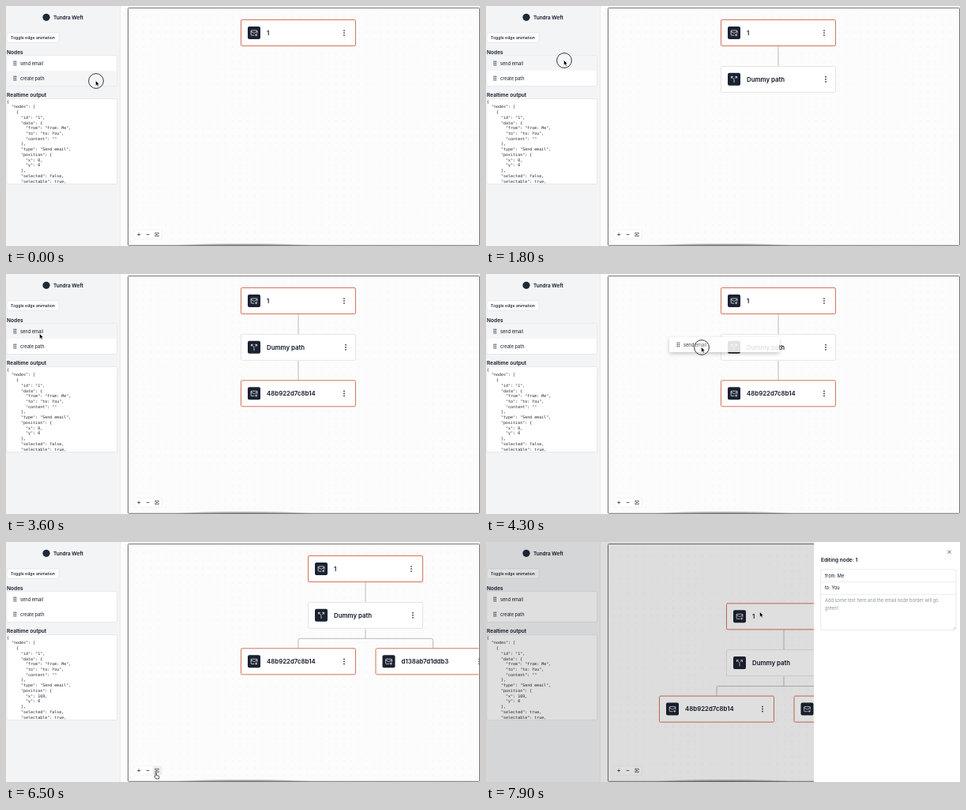
An HTML page for the animation above (8 s loop, 600 by 304 pixels).

```html
<!DOCTYPE html>
<html lang="en">
<head>
<meta charset="utf-8">
<title>Flow editor</title>
<style>
  html, body { margin: 0; width: 100%; height: 100%; overflow: hidden; background: #fcfcfc; }
  svg { display: block; width: 600px; height: 304px; font-family: Inter, "Liberation Sans", sans-serif; font-size: 5.7px; fill: #111827; }
  .bold { font-weight: 600; font-size: 6.6px; }
  .title { font-weight: 600; font-size: 7.85px; }
  .code { font: 5px "DejaVu Sans Mono", monospace; white-space: pre; fill: #20242c; }
  .box { fill: #fff; stroke: #e3e5e9; stroke-width: .8; }
  .line { fill: none; stroke: #1f2937; stroke-width: .7; stroke-linecap: round; }
  .edge { fill: none; stroke: #aaaab0; stroke-width: .8; }
  .icon { fill: none; stroke: #fff; stroke-width: 1.9; stroke-linecap: round; stroke-linejoin: round; }
  .hover { fill: #f4f5f7; }
  .hint { fill: #8b919c; }
</style>
</head>
<body>
<svg viewBox="0 0 600 304">
  <defs>
    <pattern id="dots" width="9.4" height="9.4" patternUnits="userSpaceOnUse">
      <circle cx="4.7" cy="4.7" r=".5" fill="#e2e2e2"/>
    </pattern>
    <clipPath id="stage"><rect x="155" y="3" width="443.5" height="300"/></clipPath>
    <clipPath id="output"><rect x="1" y="118" width="139" height="106.5"/></clipPath>
    <radialGradient id="dock">
      <stop offset="0" stop-color="#555" stop-opacity=".6"/>
      <stop offset=".75" stop-color="#666" stop-opacity=".4"/>
      <stop offset="1" stop-color="#888" stop-opacity="0"/>
    </radialGradient>
    <filter id="soft" x="-10%" y="-50%" width="120%" height="220%">
      <feDropShadow dx="0" dy="2" stdDeviation="2.5" flood-opacity=".25"/>
    </filter>
  </defs>

  <rect width="600" height="304" fill="#fcfcfc"/>
  <rect width="144.5" height="304" fill="#f3f4f6"/>
  <path d="M144.5 0V304" stroke="#e6e8eb" stroke-width=".8"/>

  <circle cx="51" cy="14.3" r="4.6" fill="#1f2937"/>
  <text class="bold" x="60" y="16.8" style="font-size:6.4px">Tundra Weft</text>
  <rect class="box" x="1" y="33.8" width="66" height="12.4" rx="2"/>
  <text x="6" y="41.9" style="font-size:5.15px;font-weight:500">Toggle edge animation</text>
  <text class="bold" x="1" y="61">Nodes</text>
  <rect class="box" x=".8" y="62.7" width="139.8" height="38.8" rx="2"/>
  <rect id="hoverRow" class="hover" x="1.3" width="138.8" height="18.6"/>
  <g id="rows"></g>
  <text class="bold" x="1" y="115">Realtime output</text>
  <rect class="box" x=".8" y="117.5" width="139.8" height="108" rx="2"/>
  <g id="json" clip-path="url(#output)"></g>

  <g clip-path="url(#stage)">
    <g id="view">
      <rect x="60" y="-100" width="700" height="500" fill="url(#dots)"/>
      <path id="edges" class="edge"/>
      <g id="nodes"></g>
    </g>
  </g>
  <rect x="154.5" y="2.5" width="445" height="300.8" rx="1" fill="none" stroke="#626468" stroke-width=".9"/>
  <rect x="162.5" y="283.8" width="34.6" height="11.4" fill="#fff" stroke="#eee" stroke-width=".6"/>
  <rect id="hoverFit" x="185.6" y="284" width="11.3" height="11" fill="#eeeeef"/>
  <path class="line" stroke-width=".9" d="M166.5 289.5h3.2M168.1 287.9v3.2M178 289.5h3.2M188.9 288.6v-1.4h1.4M191.7 287.2h1.4v1.4M193.1 290.4v1.4h-1.4M190.3 291.8h-1.4v-1.4M190.5 289h1v1h-1z"/>
  <ellipse cx="301" cy="304" rx="95" ry="3.6" fill="url(#dock)"/>

  <g id="drag" filter="url(#soft)" opacity=".87">
    <rect width="139.5" height="19" rx="1.5" fill="#fff"/>
    <g id="dragRows"></g>
  </g>

  <rect id="shade" width="600" height="304" fill="#000"/>
  <g id="sheet">
    <rect x="415" width="185" height="304" fill="#fff"/>
    <path class="line" d="M584.7 10.9l3.5 3.5m0-3.5l-3.5 3.5"/>
    <text class="bold" x="424" y="25">Editing node: 1</text>
    <rect class="box" x="423.8" y="34.6" width="171.2" height="77" rx="1.5"/>
    <path d="M424 50.5H595M424 66.5H595" stroke="#e8eaed" stroke-width=".8"/>
    <text x="429" y="44.6">from: Me</text>
    <text x="429" y="60.3">to: You</text>
    <text class="hint" x="429" y="75.5">Add some text here and the email node border will go</text>
    <text class="hint" x="429" y="85.9">green!</text>
    <path d="M591.5 110.3l2.6-2.6M593 110.3l1.1-1.1" stroke="#777" stroke-width=".4"/>
  </g>

  <g id="cursor">
    <circle id="press" r="9.4" fill="#fff" fill-opacity=".25" stroke="#33363b" stroke-width="1"/>
    <path id="arrow" d="M-.5-.5V6L1 4.7 2.1 7.1 3.2 6.6 2.2 4.2H4.2Z" fill="#000" stroke="#fff" stroke-width=".5"/>
    <path id="hand" d="M-1 0q.8-.8 1.5 0V2.6l3 .7q.7.3.5 1.2L3.4 7H-.2L-2.2 4.2q0-.9 1.2-.3Z" fill="#fff" stroke="#111" stroke-width=".7"/>
  </g>
</svg>
<script>
const $ = id => document.getElementById(id);
const show = (el, on) => el.setAttribute('visibility', on ? 'visible' : 'hidden');
const move = (el, x, y) => el.setAttribute('transform', `translate(${x} ${y})`);
const within = (t, spans) => spans.some(([a, b]) => t >= a && t < b);

const LOOP = 8000, STEP = 100;
const MAIL = 'M22 13V6a2 2 0 0 0-2-2H4a2 2 0 0 0-2 2v12a2 2 0 0 0 2 2h8M22 7l-9 5.7a2 2 0 0 1-2 0L2 7M16 19h6M19 16v6';
const SPLIT = 'M16 3h5v5M8 3H3v5M12 22v-8a5 5 0 0 0-1.2-3L3 3M15 9l6-6';

// time, x, y of the pointer
const PATH = [
  [0, 114, 95], [700, 350, 33], [900, 350, 33], [1500, 99, 69], [1800, 99, 69],
  [2500, 345, 99], [2700, 361, 90], [2800, 361, 90], [3500, 43, 76], [3800, 43, 76],
  [4300, 273, 93], [4600, 306, 93], [4700, 306, 93], [5100, 476, 35], [5700, 476, 35],
  [6500, 190, 293], [6700, 190, 293], [7500, 347, 89], [8000, 347, 89]
];
const PRESSED = [[0, 700], [1800, 2800], [3800, 4700], [6700, 6800]];
// start, end, row, grab offset
const DRAGS = [[100, 700, 1, 113, 13], [1900, 2800, 0, 98, 6], [3900, 4700, 0, 41, 13]];

function pointer(t) {
  const i = PATH.findIndex(p => p[0] > t);
  const [t0, x0, y0] = PATH[i - 1], [t1, x1, y1] = PATH[i];
  const u = (t - t0) / (t1 - t0), e = u * u * (3 - 2 * u);
  return [x0 + (x1 - x0) * e, y0 + (y1 - y0) * e];
}

function row(label) {
  let grip = '';
  for (let i = 0; i < 6; i++)
    grip += `<circle cx="${10.2 + i % 2 * 2.2}" cy="${7.2 + (i >> 1) * 2.3}" r=".75"/>`;
  return `<g>${grip}<text x="18" y="11.5">${label}</text></g>`;
}

function node(label, mail) {
  const kebab = [13.5, 16.5, 19.5].map(y => `<circle cx="${mail ? 130.5 : 132.5}" cy="${y}" r=".85"/>`).join('');
  return `<g><rect width="145" height="33" rx="1.5" fill="#fff" stroke="${mail ? '#d4745c' : '#e4e5e8'}"/>
    <rect x="8.5" y="8.5" width="16" height="16" rx="2" fill="#1b2231"/>
    <path class="icon" transform="translate(11.9 11.9) scale(.385)" d="${mail ? MAIL : SPLIT}"/>
    <text class="title" x="32.5" y="19.4">${label}</text>${kebab}</g>`;
}

$('rows').innerHTML = $('dragRows').innerHTML = row('send email') + row('create path');
const [sendRow, createRow] = $('rows').children;
move(sendRow, 0, 63);
move(createRow, 0, 82);
$('nodes').innerHTML = node('1', true) + node('Dummy path', false) +
  node('48b922d7c8b14', true) + node('d138ab7d1ddb3', true);

function output(x, selected) {
  const data = { nodes: [{
    id: '1', data: { from: 'from: Me', to: 'to: You', content: '' }, type: 'Send email',
    position: { x, y: 0 }, selected, selectable: true, deletable: true
  }] };
  return JSON.stringify(data, null, 2).split('\n').slice(0, 16)
    .map((s, i) => `<text class="code" x="1" y="${122.6 + i * 6.73}">${s}</text>`).join('');
}

let lastOutput;
function render(t) {
  const forked = t >= 4700, open = t >= 7700;
  const left = forked ? 382.5 : 297.5, mid = left + 72.5;
  const spots = [[left, 17.5, 0], [left, 76.3, 700], [297.5, 134.8, 2800], [468, 134.8, 4700]];
  spots.forEach(([x, y, start], i) => {
    const el = $('nodes').children[i];
    move(el, x, y);
    show(el, t >= start);
  });
  let d = '';
  if (t >= 700) d += `M${mid} 51V76`;
  if (forked) d += `M${mid} 110V122.3M370 135V124.3q0-2 2-2H538.5q2 0 2 2V135`;
  else if (t >= 2800) d += `M${mid} 110V135`;
  $('edges').setAttribute('d', d);
  t >= 6800 ? move($('view'), -78, 60.3) : move($('view'), 0, 0);

  const key = [forked ? 169 : 0, open];
  if (String(key) !== lastOutput) {
    $('json').innerHTML = output(...key);
    lastOutput = String(key);
  }

  const [x, y] = pointer(t);
  show($('hoverRow'), t < 1100 || within(t, [[1400, 5800]]));
  $('hoverRow').setAttribute('y', t < 1100 ? 82.2 : 63.2);
  show($('hoverFit'), within(t, [[6400, 6900]]));

  const drag = DRAGS.find(([a, b]) => t >= a && t < b);
  $('drag').style.display = drag ? '' : 'none';
  if (drag) {
    move($('drag'), x - drag[3], y - drag[4]);
    [...$('dragRows').children].forEach((el, i) => show(el, i === drag[2]));
  }

  const hand = within(t, [[6400, 6900]]);
  move($('cursor'), x, y);
  show($('press'), within(t, PRESSED));
  show($('arrow'), !hand);
  show($('hand'), hand);

  show($('sheet'), open);
  const u = Math.max(0, (t - 7600) / 300);
  $('shade').setAttribute('opacity', open ? .125 * u ** 3 : 0);
}

function tick(now) {
  render(Math.floor(now % LOOP / STEP) * STEP);
  requestAnimationFrame(tick);
}
render(0);
requestAnimationFrame(tick);
</script>
</body>
</html>
```
